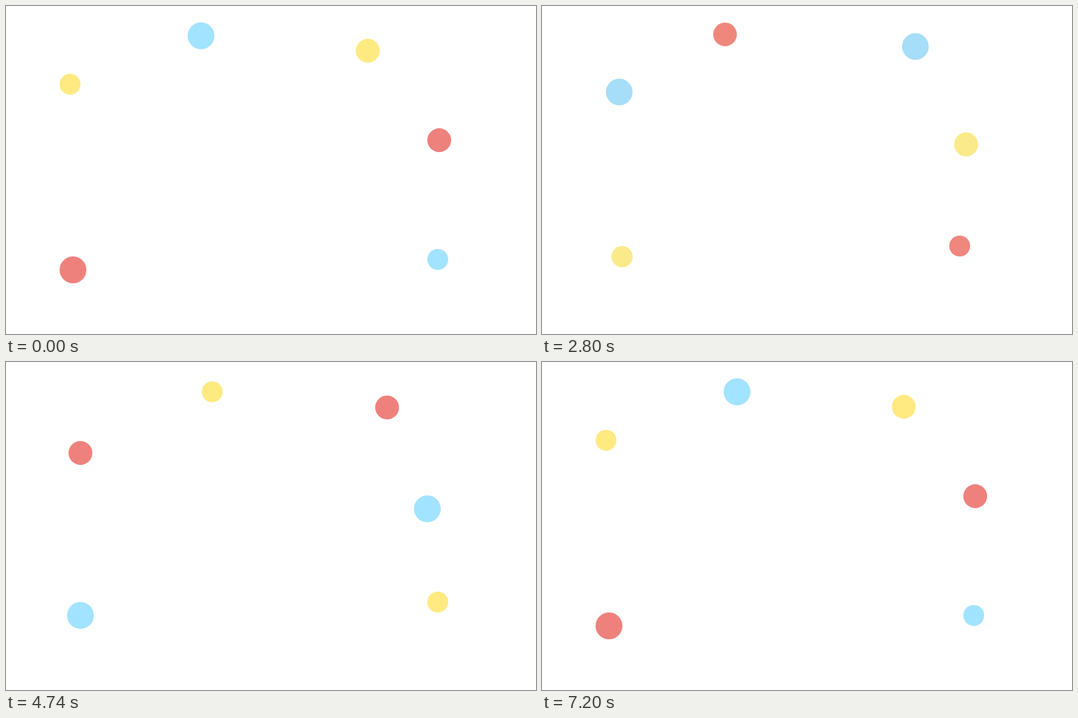
Write an HTML page without scripts that moves like this. It is 712 px wide and 440 px high and loops after 8 s.

```html
<!DOCTYPE html>
<html lang="en">
<head>
<meta charset="utf-8">
<title>Drifting dots</title>
<style>
  :root { --blue: #a2e3ff; --red: #ee817c; --yellow: #ffea82; }
  html, body { margin: 0; width: 100%; height: 100%; overflow: hidden; background: #fff; }
  svg { display: block; width: 712px; height: 440px; }

  /* Three poses per dot, 2.4 s apart, then a short rest. */
  circle { animation: drift 8s ease-in-out infinite, tint 8s ease-in-out infinite; }
  @keyframes drift {
    0%, 90%, 100% { cx: var(--x1); cy: var(--y1); r: var(--r1); }
    30% { cx: var(--x2); cy: var(--y2); r: var(--r2); }
    60% { cx: var(--x3); cy: var(--y3); r: var(--r3); }
  }
  @keyframes tint {
    0%, 90%, 100% { fill: var(--c1); }
    30% { fill: var(--c2); }
    60% { fill: var(--c3); }
  }

  .from-blue { --c1: var(--blue); --c2: var(--red); --c3: var(--yellow); }
  .from-yellow { --c1: var(--yellow); --c2: var(--blue); --c3: var(--red); }
  .from-red { --c1: var(--red); --c2: var(--yellow); --c3: var(--blue); }

  .top-left {
    --x1: 262px; --y1: 40px; --r1: 18px;
    --x2: 244px; --y2: 38px; --r2: 16px;
    --x3: 277px; --y3: 40px; --r3: 14px;
  }
  .top-right {
    --x1: 486px; --y1: 60px; --r1: 16px;
    --x2: 501px; --y2: 54px; --r2: 18px;
    --x3: 512px; --y3: 61px; --r3: 16px;
  }
  .left {
    --x1: 86px; --y1: 105px; --r1: 14px;
    --x2: 104px; --y2: 115px; --r2: 18px;
    --x3: 100px; --y3: 122px; --r3: 16px;
  }
  .right {
    --x1: 582px; --y1: 180px; --r1: 16px;
    --x2: 570px; --y2: 185px; --r2: 16px;
    --x3: 566px; --y3: 197px; --r3: 18px;
  }
  .bottom-left {
    --x1: 90px; --y1: 354px; --r1: 18px;
    --x2: 108px; --y2: 336px; --r2: 14px;
    --x3: 100px; --y3: 340px; --r3: 18px;
  }
  .bottom-right {
    --x1: 580px; --y1: 340px; --r1: 14px;
    --x2: 560px; --y2: 322px; --r2: 14px;
    --x3: 580px; --y3: 322px; --r3: 14px;
  }
</style>
</head>
<body>
<svg viewBox="0 0 712 440" aria-hidden="true">
  <circle class="top-left from-blue"/>
  <circle class="top-right from-yellow"/>
  <circle class="left from-yellow"/>
  <circle class="right from-red"/>
  <circle class="bottom-left from-red"/>
  <circle class="bottom-right from-blue"/>
</svg>
</body>
</html>
```
